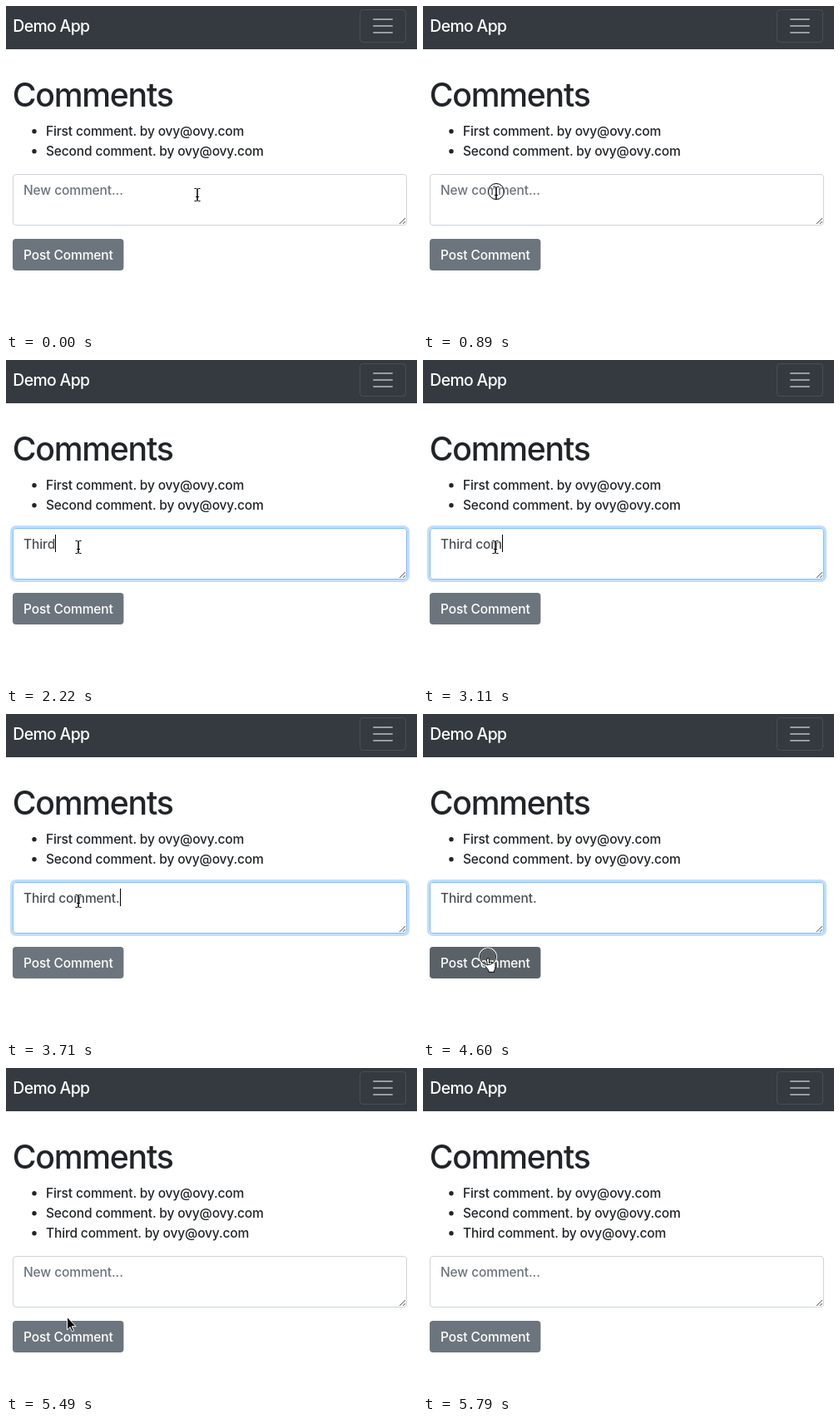
Recreate the animation shown at these times as an HTML page. Size 494x392 px, loop 6930 ms.

```html
<!DOCTYPE html>
<html lang="en">
<head>
<meta charset="utf-8">
<title>Comments demo</title>
<style>
  html, body { margin: 0; width: 100%; height: 100%; overflow: hidden; background: #fff; }
  svg { display: block; width: 494px; height: 392px; }
  text {
    font: 450 15.5px Inter, "Open Sans", sans-serif;
    font-optical-sizing: none;
    letter-spacing: -.1px;
    white-space: pre;
    fill: #212529;
  }
  .brand { font-size: 19.4px; letter-spacing: -.65px; fill: #fff; }
  .title { font-size: 39.2px; font-weight: 500; letter-spacing: -1.25px; }
  .list text { letter-spacing: -.15px; }
  .list circle { fill: #212529; }
  .box { fill: #fff; stroke: #ced4da; }
  .ring { fill: none; stroke: #bfdeff; stroke-width: 3; visibility: hidden; }
  .focus .box { stroke: #80bdff; }
  .focus .ring { visibility: visible; }
  #entry { fill: #495057; }
  #entry.hint { fill: #6c757d; }
  .btn { fill: #6c757d; }
  .hover .btn { fill: #5a6268; }
  .label { fill: #fff; }
</style>
</head>
<body>
<svg viewBox="0 0 494 392">
  <defs>
    <path id="stem" d="M-3-7.5h1.5q1.5 0 1.5 1.5v12q0 1.5-1.5 1.5h-1.5M3-7.5h-1.5q-1.5 0-1.5 1.5v12q0 1.5 1.5 1.5h1.5M-1.5 2.5h3"/>
  </defs>
  <rect width="494" height="52" fill="#343a40"/>
  <text class="brand" x="8.3" y="31">Demo App</text>
  <rect x="425.5" y="4.5" width="55" height="39" rx="3.5" fill="none" stroke="#fff" stroke-opacity=".1"/>
  <path d="M442 16h22M442 24h22M442 32h22" stroke="#fff" stroke-opacity=".5" stroke-width="2" stroke-linecap="round"/>

  <text class="title" x="7.8" y="121">Comments</text>
  <g class="list">
    <circle cx="34" cy="150.8" r="2.7"/><text x="48" y="156">First comment. by ovy@ovy.com</text>
    <circle cx="34" cy="174.8" r="2.7"/><text x="48" y="180">Second comment. by ovy@ovy.com</text>
    <g id="added"><circle cx="34" cy="198.8" r="2.7"/><text x="48" y="204">Third comment. by ovy@ovy.com</text></g>
  </g>

  <g id="form">
    <rect class="ring" x="6.5" y="200.5" width="477" height="65" rx="5.5"/>
    <rect class="box" x="8.5" y="202.5" width="473" height="61" rx="3.5"/>
    <path d="M473 262l7-7M477 262l3-3" stroke="#555"/>
    <text id="entry" x="21" y="227"></text>
    <rect id="caret" y="210" width="1" height="21"/>
    <rect class="btn" x="8" y="280" width="133.4" height="38" rx="4"/>
    <text class="label" x="21" y="305">Post Comment</text>
  </g>

  <g id="cursor">
    <g id="beam" fill="none" stroke-linecap="square">
      <use href="#stem" stroke="#fff" stroke-width="2.6" stroke-opacity=".8"/>
      <use href="#stem" stroke="#000"/>
    </g>
    <path id="hand" d="M-1.5 3.5q0-1.7 1.5-1.7t1.5 1.7v4q0-1.3 1.4-1.3t1.4 1.5q0-1 1.2-1t1.3 1.3q.2-.7 1.1-.7t1.1 1.4v3q0 3-1.5 5v1.6h-6.6v-1.6q-1.2-2-3.6-5q-.9-1.3 0-2q1.2-.7 2.2.8z" fill="#fff" stroke="#000" stroke-linejoin="round"/>
    <path id="arrow" d="M-.5-.5v15.4l3.6-3.4 2.2 5.2 2.2-.9-2.3-5.1h4.8z" fill="#000" stroke="#fff"/>
    <g id="click" fill="none">
      <circle r="10" stroke="#fff" stroke-width="2.4" stroke-opacity=".8"/>
      <circle r="9.5" stroke="#000"/>
    </g>
  </g>
</svg>
<script>
const LOOP = 6930;
const el = id => document.getElementById(id);
const [added, form, entry, caret, cursor, click] =
  ['added', 'form', 'entry', 'caret', 'cursor', 'click'].map(el);
const shapes = ['beam', 'hand', 'arrow'];

const at = (x, y, shape) => shape ? { x, y, shape } : { x, y };
const type = text => ({ text, caret: true });

// Each step starts at its time and changes only the listed properties.
const steps = [
  [0, { ...at(230, 227, 'beam'), text: '', caret: false, focus: false, hover: false, click: false, posted: false }],
  [150, at(222, 227)],
  [300, at(186, 226)],
  [450, at(134, 225)],
  [600, at(98, 225)],
  [740, at(88, 225)],
  [890, { click: true }],
  [1030, { click: false, focus: true, caret: true, x: 87 }],
  [1480, { caret: false }],
  [1630, type('T')],
  [1780, type('Th')],
  [1920, type('Thi')],
  [2070, type('Thir')],
  [2220, type('Third')],
  [2520, type('Third ')],
  [2660, type('Third c')],
  [2960, type('Third co')],
  [3110, type('Third com')],
  [3260, type('Third comm')],
  [3410, type('Third commen')],
  [3560, type('Third comment')],
  [3710, type('Third comment.')],
  [4160, { ...at(87, 231), caret: false }],
  [4300, at(84, 256)],
  [4450, { ...at(78, 292, 'hand'), hover: true }],
  [4600, { click: true }],
  [4750, { click: false, focus: false }],
  [4900, { ...at(76, 292, 'arrow'), hover: false, text: '', posted: true }],
  [5490, at(74, 300)],
  [5640, at(70, 366)],
  [5790, { shape: '' }]
];

let state = {};
const scenes = steps.map(([time, change]) => [time, state = { ...state, ...change }]);
const show = (node, on) => node.setAttribute('visibility', on ? 'visible' : 'hidden');

function draw(s) {
  show(added, s.posted);
  form.setAttribute('transform', `translate(0 ${s.posted ? 24 : 0})`);
  form.classList.toggle('focus', s.focus);
  form.classList.toggle('hover', s.hover);
  entry.classList.toggle('hint', !s.text);
  entry.textContent = s.text || 'New comment...';
  const width = s.text ? entry.getComputedTextLength() : 0;
  caret.setAttribute('x', Math.round(21 + width));
  show(caret, s.caret);
  cursor.setAttribute('transform', `translate(${s.x} ${s.y})`);
  for (const name of shapes) show(el(name), name === s.shape);
  click.setAttribute('transform', `translate(0 ${s.shape === 'beam' ? -2 : 0})`);
  show(click, s.click);
}

let current;
function tick() {
  const t = performance.now() % LOOP;
  const scene = scenes.findLast(([time]) => time <= t)[1];
  if (scene !== current) draw(current = scene);
  requestAnimationFrame(tick);
}
tick();
</script>
</body>
</html>
```
